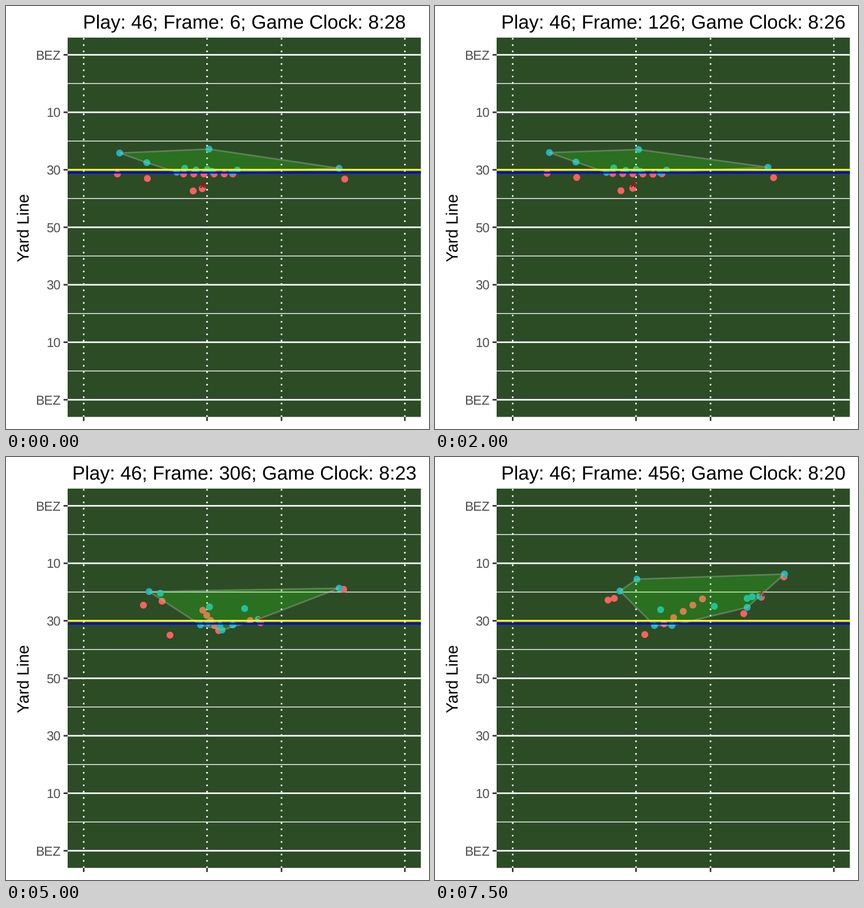
A matplotlib script that plays this animation: 748x748 px, repeating every 8 s.

```python
import numpy as np
import matplotlib.pyplot as plt
from matplotlib.animation import FuncAnimation
from matplotlib.patches import Circle, Polygon, Rectangle

SIZE, DPI = 748, 100
PX = 72 / DPI  # points per pixel
STEPS, INTERVAL = 16, 500
SNAP, MID, END = 3, 10, 15
CLOCK_TICKS = (1, 3, 5, 8, 9, 11, 13, 15)  # steps at which the clock drops a second
LEFT, RIGHT, TOP, BOTTOM = 109, 733.6, 55.9, 726.6
GOAL, TEN_YARDS = 86.3, 50.83

plt.rcParams.update({"font.family": "Liberation Sans", "text.hinting": "no_hinting",
                     "path.snap": False})


def run(start, mid, end):
    """Cubic path that leaves start at rest on the snap and passes mid and end."""
    start, mid, end = np.array([start, mid, end], float)
    t = np.clip(np.arange(STEPS) - SNAP, 0, None)[:, None]
    a, b = MID - SNAP, END - SNAP
    u, v = (mid - start) / a**2, (end - start) / b**2
    return start + t**2 * (u + (v - u) * (t - a) / (b - a))


def convex_hull(points):
    pts = sorted(map(tuple, points))

    def half(seq):
        out = []
        for x, y in seq:
            while len(out) > 1:
                (ax, ay), (bx, by) = out[-2:]
                if (bx - ax) * (y - ay) - (by - ay) * (x - ax) > 0:
                    break
                out.pop()
            out.append((x, y))
        return out[:-1]

    return half(pts) + half(pts[::-1])


quarterback = run((347, 323), (450, 293), (577, 248))

# Five linemen in a row, who turn into a slanted wall
line_men = [run((314 + 18 * i, 297), (348 + 7 * i, 271 + 9 * i), (473 - 17 * i, 251 + 11 * i))
            for i in range(5)]

offense = np.array(line_men + [
    run((401, 297), (432, 289), (546, 277)),  # tight end
    run((197, 297), (243, 262), (306, 253)),  # receivers
    run((250, 305), (276, 255), (317, 250)),
    run((599, 306), (597, 234), (617, 212)),
    run((331, 327), (290, 315), (371, 314)),  # back
    quarterback,
])

defense = np.array([
    run((201, 260), (253, 238), (327, 237)),  # corners
    run((249, 277), (273, 241), (357, 216)),
    run((589, 287), (589, 232), (618, 207)),
    run((359, 253), (422, 268), (574, 246)),  # safety
    run((316, 287), (360, 265), (552, 250)),  # front seven
    run((302, 294), (344, 297), (399, 270)),
    run((336, 290), (382, 306), (419, 298)),
    run((356, 289), (358, 293), (388, 298)),
    run((364, 292), (378, 297), (494, 264)),
    run((399, 294), (401, 297), (552, 266)),
    run((409, 290), (446, 287), (561, 247)),
])

fig = plt.figure(figsize=(SIZE / DPI, SIZE / DPI), dpi=DPI, facecolor="white")
ax = fig.add_axes([0, 0, 1, 1])
ax.set(xlim=(0, SIZE), ylim=(SIZE, 0))
ax.axis("off")


def line(x, y, color, width, **kw):
    kw = {"solid_capstyle": "butt", "dash_capstyle": "butt", "zorder": 1} | kw
    ax.plot(x, y, color=color, lw=width * PX, **kw)


def team(paths, color, z):
    return [ax.add_patch(Circle(p[0], 6.1, fc=color, lw=0, zorder=z)) for p in paths]


def label(x, y, text, size, color="black", **kw):
    return ax.text(x, y, text, fontsize=size * PX, color=color, va="baseline", **kw)


# Field, grid and axes
ax.add_patch(Rectangle((LEFT, TOP), RIGHT - LEFT, BOTTOM - TOP, fc="#2C4C26", lw=0, zorder=0))
for k in range(13):
    y = GOAL + TEN_YARDS * k
    major = k % 2 == 0
    line([LEFT, RIGHT], [y, y], "white", 2.8 if major else 1.4)
    if major:
        name = ("BEZ", "10", "30", "50", "30", "10", "BEZ")[k // 2]
        line([LEFT - 7.2, LEFT], [y, y], "#333333", 2.8)
        label(96.3, y + 8.3, name, 22.9, "#4D4D4D", ha="right")
for x in (137.4, 355.5, 487.2, 705.3):
    line([x, x], [BOTTOM, TOP], "white", 2.78, linestyle=(0, (1, 3)))
    line([x, x], [BOTTOM, BOTTOM + 7.2], "#333333", 2.8)
label(40.5, 391.3, "Yard Line", 28.6, ha="center", rotation=90, rotation_mode="anchor")
title = label(421.2, 39.8, "", 34.2, ha="center")

# Players, ball, defensive hull and the two down markers
reds = team(offense, "#FB615D", 2)
teals = team(defense, "#1EB4BB", 3)
ball, = ax.plot([], [], marker=(5, 2, 0), color="#8F181F", ms=12 * PX, mew=2.2 * PX, zorder=4)
hull = ax.add_patch(Polygon([(0, 0)] * 3, closed=True, fc=(0.16, 1, 0.04, 0.2),
                            ec=(0.745, 0.745, 0.745, 0.35), lw=2.8 * PX, zorder=5))
first_down = GOAL + 4 * TEN_YARDS
for y, color in ((first_down + TEN_YARDS / 10, "#0000E0"), (first_down, "#FFFF1E")):
    line([LEFT, RIGHT], [y, y], color, 3.3, zorder=6)


def update(i):
    second = 28 - sum(i >= tick for tick in CLOCK_TICKS)
    title.set_text(f"Play: 46; Frame: {6 + 30 * i}; Game Clock: 8:{second}")
    for dot, path in zip(reds + teals, [*offense, *defense]):
        dot.center = path[i]
    x, y = quarterback[i]
    ball.set_data([x], [y - 7])
    hull.set_xy(convex_hull(defense[:, i]))
    return title, ball, hull, *reds, *teals


anim = FuncAnimation(fig, update, frames=STEPS, interval=INTERVAL, repeat=True, repeat_delay=0)
plt.show()
```
